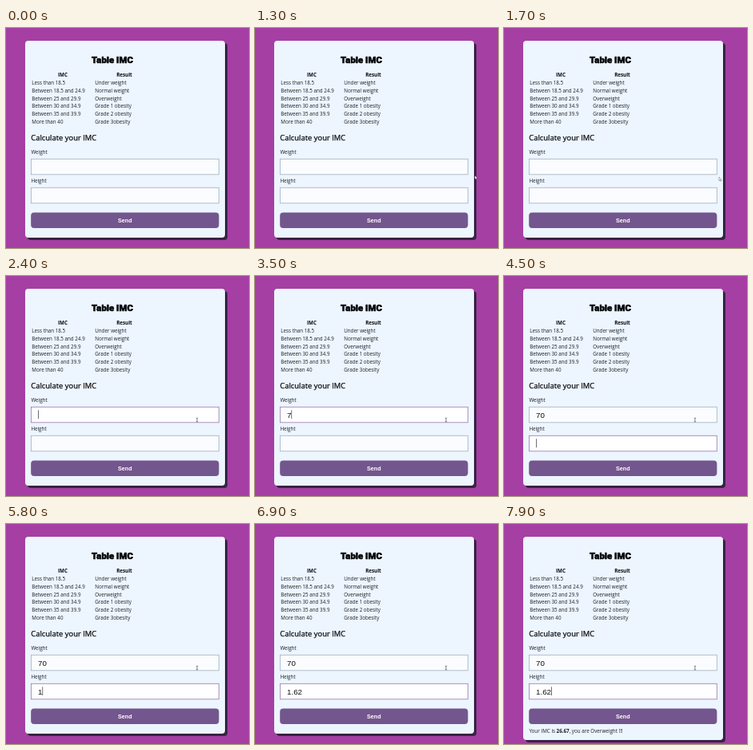
These frames come from a looping animation (304x276 px, 8 s). An HTML page:

```html
<!DOCTYPE html>
<html lang="en">
<head>
<meta charset="utf-8">
<title>Table IMC</title>
<style>
  html, body { margin: 0; width: 100%; height: 100%; overflow: hidden; background: #a53fa3; }
  svg { display: block; width: 304px; height: 276px; }
  text { font: 6.27px "Open Sans", "Noto Sans", sans-serif; fill: #1c2027; white-space: pre; }
  .title { font: 800 11.4px Roboto, sans-serif; fill: #050608; stroke: #050608; stroke-width: .55; stroke-linejoin: round; text-anchor: middle; }
  .head { font-weight: 700; fill: #0b0d11; text-anchor: middle; }
  .sub { font-size: 9.41px; fill: #0b0d11; stroke: #0b0d11; stroke-width: .25; }
  .value { font: 9.8px "Liberation Sans", Arial, sans-serif; fill: #111; }
  .send { font: 700 7.2px "Liberation Sans", Arial, sans-serif; fill: #fff; text-anchor: middle; }
  .field { fill: #fafcff; stroke: #a3b1bf; stroke-width: .8; }
  .field.focus { fill: #fff; stroke: #9a78ae; }
  .caret { fill: #333; }
  b, .bold { font-weight: 700; }
</style>
</head>
<body>
<svg viewBox="0 0 304 276">
  <defs><filter id="soft" x="-5%" y="-5%" width="110%" height="110%"><feGaussianBlur stdDeviation=".5"/></filter></defs>
  <rect width="304" height="276" fill="#a53fa3"/>
  <rect id="shadow" x="27" y="19" width="250" height="247" rx="4" fill="#372344" filter="url(#soft)"/>
  <rect id="card" x="24" y="16" width="250" height="247" rx="4" fill="#edf5fe"/>
  <text class="title" x="133" y="44">Table IMC</text>
  <text class="head" x="71" y="61.2">IMC</text>
  <text class="head" x="148" y="61.2">Result</text>
  <g id="rows"></g>
  <text class="sub" x="31.3" y="141.3">Calculate your IMC</text>
  <text x="31.4" y="158.4">Weight</text>
  <rect class="field" id="weight" x="31.5" y="164.3" width="234.8" height="19.5"/>
  <text class="value" id="weightText" x="40" y="177.5"></text>
  <text x="31.4" y="194.2">Height</text>
  <rect class="field" id="height" x="31.5" y="200.3" width="234.8" height="19.5"/>
  <text class="value" id="heightText" x="40" y="213.5"></text>
  <rect class="caret" id="caret" width=".7" height="10.8"/>
  <rect x="31.2" y="231.5" width="235.2" height="19.6" rx="4" fill="#74568e"/>
  <text class="send" x="148.8" y="243.5">Send</text>
  <text id="result" x="31.4" y="261.7">Your IMC is <tspan class="bold">26.67</tspan>, you are Overweight !!!</text>
  <path id="arrow" d="M0 0V4.6L1.1 3.7 1.9 5.3 2.6 5 1.9 3.4H3.3Z" fill="#fff" stroke="#222" stroke-width=".35"/>
  <path id="beam" d="M-1.2 -2.5Q0 -2.5 0 -1.8Q0 -2.5 1.2 -2.5M0 -1.8V1.8M-1.2 2.5Q0 2.5 0 1.8Q0 2.5 1.2 2.5" fill="none" stroke="#333" stroke-width=".6"/>
</svg>
<script>
const LOOP = 8000;
const $ = id => document.getElementById(id);

const rows = [
  ['Less than 18.5', 'Under weight'],
  ['Between 18.5 and 24.9', 'Normal weight'],
  ['Between 25 and 29.9', 'Overweight'],
  ['Between 30 and 34.9', 'Grade 1 obesity'],
  ['Between 35 and 39.9', 'Grade 2 obesity'],
  ['More than 40', 'Grade 3obesity']
];
rows.forEach((row, i) => row.forEach((label, col) => {
  const t = document.createElementNS('http://www.w3.org/2000/svg', 'text');
  t.setAttribute('x', col ? 111.2 : 32.3);
  t.setAttribute('y', 71 + i * 9.82);
  t.textContent = label;
  $('rows').append(t);
}));

// Each step: [start ms, value]
const focus = [[0, ''], [2300, 'weight'], [4500, 'height']];
const weight = [[0, ''], [3300, '7'], [3700, '70']];
const height = [[0, ''], [5800, '1'], [6000, '1.'], [6200, '1.6'], [6400, '1.62']];
const blink = [[0, 0], [2300, 1], [2900, 0], [3300, 1], [4200, 0], [4500, 1],
  [5000, 0], [5600, 1], [6900, 0], [7400, 1]];
const pointer = [[1300, 275, 185], [1900, 266, 188], [2100, 247, 185], [2250, 239, 180.5]];

const at = (steps, t) => steps.filter(s => s[0] <= t).pop()[1];
const show = (id, on) => $(id).style.display = on ? '' : 'none';

function pointerAt(t) {
  const i = pointer.findIndex(p => p[0] > t);
  if (i < 0) return pointer[pointer.length - 1].slice(1);
  const [a, b] = [pointer[i - 1], pointer[i]];
  const k = (t - a[0]) / (b[0] - a[0]);
  return [a[1] + (b[1] - a[1]) * k, a[2] + (b[2] - a[2]) * k];
}

function movePointer(t) {
  const on = t >= pointer[0][0];
  const [x, y] = on ? pointerAt(t) : [0, 0];
  const overField = x < 266 && y < 184;
  show('arrow', on && !overField);
  show('beam', on && overField);
  const place = `translate(${x} ${y})`;
  $('arrow').setAttribute('transform', place);
  $('beam').setAttribute('transform', place);
}

function caretX(text) {
  const em = [...text].reduce((w, c) => w + (c === '.' ? .278 : .556), 0);
  return 40 + em * 9.8;
}

function draw(t) {
  const active = at(focus, t);
  const values = { weight: at(weight, t), height: at(height, t) };
  for (const id in values) {
    $(id).classList.toggle('focus', id === active);
    $(id + 'Text').textContent = values[id];
  }
  show('caret', at(blink, t));
  $('caret').setAttribute('x', caretX(values[active] || ''));
  $('caret').setAttribute('y', active === 'height' ? 204.3 : 168.3);

  const done = t >= 7100;
  show('result', done);
  $('card').setAttribute('height', done ? 255 : 247);
  $('shadow').setAttribute('height', done ? 255 : 247);
  movePointer(t);
}

const start = performance.now();
function tick() {
  draw((performance.now() - start) % LOOP);
  requestAnimationFrame(tick);
}
tick();
</script>
</body>
</html>
```
